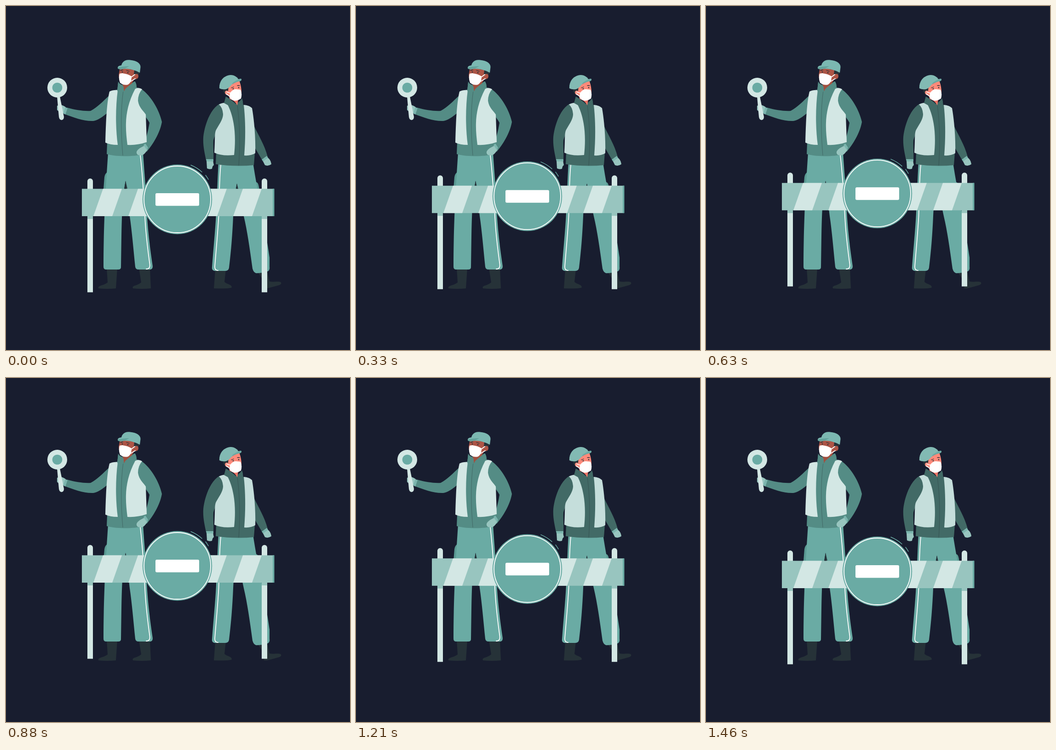
An HTML page for the animation above (1500 ms loop, 748 by 748 pixels).

```html
<!DOCTYPE html>
<html lang="en">
<head>
<meta charset="utf-8">
<title>Road barrier</title>
<style>
  html, body { margin: 0; height: 100%; overflow: hidden; background: #181d2f; }
  svg { display: block; width: 100vw; height: 100vh; }
  .teal { fill: #6aaba4; }
  .soft { fill: #98c5bf; }
  .pale { fill: #d3e7e4; }
  .dark { fill: #263238; }
  .white { fill: #fff; }
  .line { fill: none; stroke: #fff; stroke-width: 1.8; stroke-linecap: round; }
  .fold { fill: none; stroke: #263238; stroke-width: 1; stroke-opacity: .4; }
  .brow { fill: none; stroke: #263238; stroke-width: 1.3; stroke-linecap: round; }
</style>
</head>
<body>
<svg viewBox="0 0 748 748">
  <g id="tall-guard">
    <path class="dark" d="M219 570H242L239 614Q220 616 201 614C199 607 211 609 221 601ZM289 570H313L315 614Q295 616 276 614C273 607 285 609 294 601Z"/>
    <path fill="#5a9a93" d="M221 361Q215 364 214 372L212 398H222Z"/>
    <path class="teal" d="M222 318H298C300 350 302 375 304 400C306 470 312 520 319 566Q319 572 314 573H288Q282 573 281 567C277 530 274 490 269 457L260 380C253 420 252 450 251 500L250 568Q250 573 244 573H218Q212 573 212 567C212 520 213 480 216 410Z"/>
    <path class="dark" d="M260 380L257 397H264Z" opacity=".85"/>
    <path class="line" d="M292 325C295 350 299 400 302 457C304 500 309 535 312.500 561Q314 572 305 572"/>
    <g fill="#548c85">
      <path d="M133 221C150 226 170 229 184 228C198 221 211 207 225 194L221 232C210 241 199 249 190 250C170 251 148 243 125 234Z"/>
      <path d="M244 166C252 174 264 176 279 164Q284 166 284 177L296 181L305 295L298 303V322C280 328 238 328 219 322L220 297L225 186L242 182Z"/>
      <path d="M295 181C316 196 333 226 339 252C335 276 320 300 306 317L296 306C304 292 309 273 312 254C309 246 289 226 287 208Q287 190 295 181Z"/>
    </g>
    <path class="pale" d="M225 186Q233 182 243 183C238 220 238 265 243 302Q226 302 216 297C217 255 219 210 225 186ZM281 180Q289 176 296 181Q287 191 287 206C289 221 299 228 304 236L306 296Q286 303 264 302C259 262 257 226 281 180Z"/>
    <path class="fold" d="M255 184C249 225 250 280 254 325"/>
    <path class="soft" d="M302 303L308 311C301 325 295 326 287 324C281 319 284 314 291 309Z"/>
    <path fill="#7bb5ae" d="M299 302L303 299L309 308L306 313Z"/>
    <path class="soft" d="M111 217Q121 212 131 221L129 233Q119 234 111 226Z"/>
    <path fill="#7bb5ae" d="M129 220L134 222L129 236L124 233Z"/>
    <path class="pale" d="M111 196H117L126 241Q126 247 121 248Q116 248 115 241Z"/>
    <circle class="pale" cx="111.5" cy="177.5" r="21.5"/>
    <circle class="teal" cx="111.5" cy="177.5" r="10.8"/>
    <path fill="#a0503f" d="M253 168L275 155L274 172Q263 176 257 185Z"/>
    <path fill="#548c85" d="M244 164Q247 172 256 176L255 187L242 185ZM258 182Q266 173 281 164L284 178L262 190Z"/>
    <path class="dark" d="M274 140L291 143Q290 151 281 154Z"/>
    <path fill="#ad5546" d="M248 133L279 139L278 149Q287 145 288 152Q288 160 279 159Q273 172 263 172Q246 170 245 150Z"/>
    <path class="brow" d="M249 140L254 139M262 140L268 142"/>
    <circle class="dark" cx="253" cy="143.5" r="1.3"/>
    <circle class="dark" cx="265" cy="145" r="1.3"/>
    <path class="white" d="M247 147C255 145 265 148 273 153C273 162 271 167 265 171Q255 173 248 167Q244 157 247 147Z"/>
    <path class="line" d="M272 155L280 149M271 164L281 158"/>
    <path fill="#7bb8b1" d="M251 129C253 120 261 116 270 117.500C285 119 293 125 292.500 133L291 145C281 140 268 135 254 137Q246 138 243 135Q242 130 251 129Z"/>
    <path fill="#62a19a" d="M243 134Q251 131 268 131Q262 135 254 137Q246 139 243 136Z"/>
  </g>

  <g id="short-guard">
    <path class="dark" d="M455 573H478L475 600C482 606 491 605 491 612Q487 615 452 614ZM549 580L568 577L573 599C582 601 589 598 597 600Q601 604 594 607L568 614H561L563 604Z"/>
    <path fill="#5a9a93" d="M541 382Q548 383 549 389L551 399H542Z"/>
    <path class="teal" d="M462 340H537C542 374 551 420 558 457C562 480 570 524 573 547V567Q574 575 569 577Q556 581 544 581Q538 579 536 571C531 535 525 490 517 457L502 386C497 410 495 438 494 457C492 506 488 544 485 569Q484 576 477 576H453Q447 574 448 568C451 525 455 490 457 450C459 410 460 375 462 340Z"/>
    <path class="dark" d="M502 386L500 398H505Z" opacity=".85"/>
    <path class="line" d="M467 346C464 372 464 410 462.500 457C460 500 456 540 454 567Q454 575 461 575"/>
    <g fill="#426a66">
      <path d="M539 260C549 282 562 301 569 328L557 335L541 308Z"/>
      <path d="M478 197Q488 211 499 213Q508 209 513 201Q516 207 515 215L530 218L541 320L539 346Q497 350 456 344L457 318L463 214L475 211Z"/>
      <path d="M464 213C440 227 430 270 429 286C428 304 432 320 435 335H451C452 320 450 303 451 292C456 274 472 255 473 237Q472 220 464 213Z"/>
    </g>
    <path fill="#c5dedb" d="M463 214Q472 209 480 211C496 239 501 280 496 324Q470 327 453 319C455 290 453 276 457 269C463 258 472 247 472 235Q471 221 463 214ZM517 215Q529 216 535 222C540 250 543 290 542 320Q533 326 518 325C521 288 521 250 517 215Z"/>
    <path class="fold" d="M503 215C509 260 509 305 506 347"/>
    <path class="soft" d="M436 336H450L452 346Q449 347 448 354Q442 356 437 353ZM558 336L568 329Q576 334 577 344Q570 349 563 346Z"/>
    <path fill="#7bb5ae" d="M435 333H451V338H436ZM556 334L567 326L570 330L559 338Z"/>
    <path fill="#ee7768" d="M485 194L505 203L503 216Q497 205 486 202Z"/>
    <path fill="#426a66" d="M478 197Q488 202 501 214L498 224L474 211ZM503 215Q509 210 513 201L516 216L506 224Z"/>
    <path class="dark" d="M470 178L486 173L483 195Q475 193 472 184Z"/>
    <path fill="#ff8a7a" d="M484 174L507 162Q512 174 512 188Q510 204 498 204Q489 200 486 194Q477 195 476 188Q477 182 483 185Z"/>
    <path class="brow" d="M490 178L495 176M503 173L508 173"/>
    <circle class="dark" cx="494" cy="180" r="1.3"/>
    <circle class="dark" cx="506" cy="177.500" r="1.300"/>
    <path class="white" d="M487 189C491 184 495 181 499 181L510 182Q514 191 511 201Q505 206 497 206Q488 204 486 198Z"/>
    <path class="line" d="M488 189.500L480 187M487 197L479 191"/>
    <path fill="#82bab3" d="M464 179C463 167 470 157 476 154C484 149 493 149 499 153Q503 155 505 159L511 158Q513 160 510 163C503 164 497 166 492 170C487 175 484 179 478 181Q469 182 464 179Z"/>
    <path fill="#6aaba4" d="M492 168Q500 160 511 158.500Q514 161 509 163.500Q500 165 492 170Z"/>
  </g>

  <g id="barrier">
    <path class="pale" d="M177 622.500V381a6 6 0 0 1 12 0V622.500ZM556 622.500V381a6 6 0 0 1 12 0V622.500Z"/>
    <path class="soft" d="M177 457h12v6h-12ZM556 457h12v6h-12ZM165 397.500H583V457H165Z"/>
    <path class="teal" d="M580 397.500h3.500V457h-3.500Z"/>
    <path id="stripes" class="pale"/>
    <circle class="teal" cx="372.500" cy="420.500" r="75.700"/>
    <circle class="line" cx="372.500" cy="420.500" r="72.500"/>
    <rect class="white" x="325" y="407" width="95" height="27.500" rx="3"/>
    <path fill="none" stroke="#6aaba4" stroke-width="1.500" stroke-linecap="round" d="M402 346A80 80 0 0 1 426 361M434 368A80 80 0 0 1 440 377"/>
  </g>
</svg>
<script>
  const LOOP = 1500, FPS = 24, LAST = 35, LIFT = 15;
  const barrier = document.getElementById('barrier');
  const start = performance.now();

  let stripes = '';
  for (let x = 190; x < 560; x += 76) stripes += `M${x} 457l21 -59.5h41l-21 59.5Z`;
  document.getElementById('stripes').setAttribute('d', stripes);

  function draw() {
    const t = (performance.now() - start) % LOOP;
    const step = Math.min(LAST, Math.floor((t + 4) * FPS / 1000));
    const rise = LIFT * (1 - Math.abs(1 - 2 * step / LAST));
    barrier.setAttribute('transform', `translate(0 ${-rise})`);
    requestAnimationFrame(draw);
  }
  draw();
</script>
</body>
</html>
```
